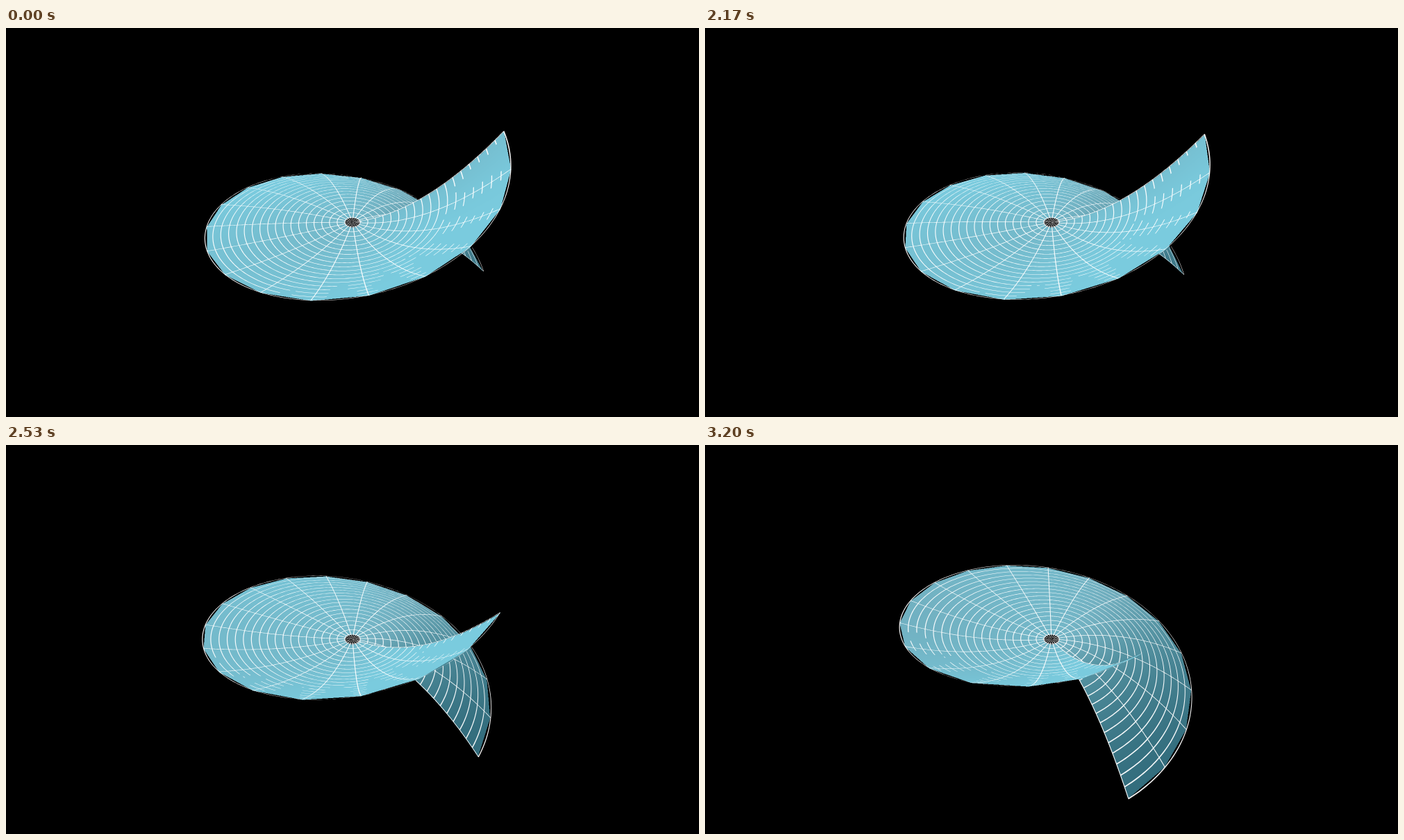
Animation of 998x561 px, one loop 5 s. Source, as an HTML page with a canvas:

```html
<!DOCTYPE html>
<html lang="en">
<head>
<meta charset="utf-8">
<title>Spiral sheet</title>
<style>
  html, body { margin: 0; width: 100%; height: 100%; overflow: hidden; background: #000; }
  canvas { display: block; width: 998px; height: 561px; }
</style>
</head>
<body>
<canvas id="stage" width="998" height="561"></canvas>
<script>
const ctx = document.getElementById('stage').getContext('2d');
const TAU = 2 * Math.PI, RAD = Math.PI / 180;

// Sheet: height = TWIST * (psi - PI) * r^2, with psi measured from the cut.
const RADIUS = 3, CELLS = 19, TWIST = 1 / 15;
const CUT_START = 10 * RAD, CUT_END = -60 * RAD;

// Mesh lines are flat ribbons lying just above the sheet.
const NUDGE = 0.01, HALF_WIDTH = 0.008, DEPTH_BIAS = 0.0007;

// Perspective camera
const CENTER_X = 499, CENTER_Y = 280.5, UNIT = 561 / 8, FOCAL = 16;
const SIN = Math.sin(50 * RAD), COS = Math.cos(50 * RAD);
const LIGHT = [-10, 10, 10];
const SHADES = [
  [-0.25, 50, 108, 124],
  [0.2, 84, 146, 161],
  [0.45, 112, 173, 189],
  [0.85, 122, 203, 222]
];

// Supersampled buffer around the sheet, with a depth value per pixel
const BOX = { x: 268, y: 138, w: 474, h: 384 }, SS = 2;
const bufferW = BOX.w * SS, bufferH = BOX.h * SS;
const buffer = document.createElement('canvas');
buffer.width = bufferW;
buffer.height = bufferH;
const bufferCtx = buffer.getContext('2d');
const image = bufferCtx.createImageData(bufferW, bufferH);
const depth = new Float32Array(bufferW * bufferH);

function project(x, y, z) {
  const scale = FOCAL / (FOCAL - (z * COS - y * SIN));
  return {
    x: CENTER_X + x * scale * UNIT,
    y: CENTER_Y - (z * SIN + y * COS) * scale * UNIT,
    near: scale
  };
}

function sheetPoint(r, psi, cut) {
  const q = psi - Math.PI;
  const x = r * Math.cos(cut + psi), y = r * Math.sin(cut + psi);
  const nx = -TWIST * (2 * q * x - y), ny = -TWIST * (2 * q * y + x);
  const len = Math.hypot(nx, ny, 1);
  return { pos: [x, y, TWIST * q * r * r], normal: [nx / len, ny / len, 1 / len] };
}

function shade({ pos, normal }) {
  const toLight = LIGHT.map((v, i) => v - pos[i]);
  const lit = toLight.reduce((sum, v, i) => sum + v * normal[i], 0) / Math.hypot(...toLight);
  let i = 0;
  while (i < SHADES.length - 2 && lit > SHADES[i + 1][0]) i++;
  const a = SHADES[i], b = SHADES[i + 1];
  const f = Math.min(1, Math.max(0, (lit - a[0]) / (b[0] - a[0])));
  return [1, 2, 3].map(c => a[c] + (b[c] - a[c]) * f);
}

function surfaceVertex(ring, spoke, cut) {
  const point = sheetPoint(RADIUS * ring / CELLS, TAU * spoke / CELLS, cut);
  const p = project(...point.pos);
  return { x: (p.x - BOX.x) * SS, y: (p.y - BOX.y) * SS, near: p.near, color: shade(point) };
}

function fillTriangle(a, b, c) {
  const area = (b.x - a.x) * (c.y - a.y) - (b.y - a.y) * (c.x - a.x);
  if (Math.abs(area) < 1e-6) return;
  const left = Math.max(0, Math.floor(Math.min(a.x, b.x, c.x)));
  const right = Math.min(bufferW - 1, Math.ceil(Math.max(a.x, b.x, c.x)));
  const top = Math.max(0, Math.floor(Math.min(a.y, b.y, c.y)));
  const bottom = Math.min(bufferH - 1, Math.ceil(Math.max(a.y, b.y, c.y)));
  for (let row = top; row <= bottom; row++) {
    for (let col = left; col <= right; col++) {
      const x = col + 0.5, y = row + 0.5;
      const u = ((b.x - x) * (c.y - y) - (b.y - y) * (c.x - x)) / area;
      const v = ((c.x - x) * (a.y - y) - (c.y - y) * (a.x - x)) / area;
      const w = 1 - u - v;
      if (u < 0 || v < 0 || w < 0) continue;
      const near = u * a.near + v * b.near + w * c.near;
      const i = row * bufferW + col;
      if (near <= depth[i]) continue;
      depth[i] = near;
      for (let k = 0; k < 3; k++) {
        image.data[4 * i + k] = u * a.color[k] + v * b.color[k] + w * c.color[k];
      }
      image.data[4 * i + 3] = 255;
    }
  }
}

function drawSurface(cut) {
  depth.fill(0);
  image.data.fill(0);
  const grid = [];
  for (let ring = 0; ring <= CELLS; ring++) {
    grid.push(Array.from({ length: CELLS + 1 }, (_, spoke) => surfaceVertex(ring, spoke, cut)));
  }
  // The innermost ring of cells stays open.
  for (let i = 1; i < CELLS; i++) {
    for (let j = 0; j < CELLS; j++) {
      fillTriangle(grid[i][j], grid[i + 1][j], grid[i][j + 1]);
      fillTriangle(grid[i + 1][j], grid[i + 1][j + 1], grid[i][j + 1]);
    }
  }
  bufferCtx.putImageData(image, 0, 0);
  ctx.drawImage(buffer, BOX.x, BOX.y, BOX.w, BOX.h);
}

function isVisible(p) {
  const col = Math.floor((p.x - BOX.x) * SS), row = Math.floor((p.y - BOX.y) * SS);
  if (col < 0 || row < 0 || col >= bufferW || row >= bufferH) return true;
  return p.near >= depth[row * bufferW + col] - DEPTH_BIAS;
}

function meshPoint(r, psi, cut) {
  const { pos, normal } = sheetPoint(r, psi, cut);
  return project(...pos.map((v, k) => v + NUDGE * normal[k]));
}

// Adds the unhidden parts of a ribbon; at(f, side) gives [r, psi] for side -1, 0 or 1.
function traceRibbon(steps, cut, at) {
  let last = null;
  for (let i = 0; i <= steps; i++) {
    const [a, mid, b] = [-1, 0, 1].map(side => meshPoint(...at(i / steps, side), cut));
    const visible = isVisible(mid);
    if (visible && last) {
      ctx.moveTo(last.a.x, last.a.y);
      ctx.lineTo(a.x, a.y);
      ctx.lineTo(b.x, b.y);
      ctx.lineTo(last.b.x, last.b.y);
      ctx.closePath();
    }
    last = visible ? { a, b } : null;
  }
}

function drawMesh(cut) {
  ctx.beginPath();
  for (let i = 0; i <= CELLS; i++) {
    const f = i / CELLS;
    if (i) traceRibbon(CELLS * 16, cut, (t, side) => [RADIUS * f + side * HALF_WIDTH, TAU * t]);
    // Spokes taper towards the centre.
    traceRibbon(CELLS * 8, cut, (t, side) => {
      const r = RADIUS * t;
      return [r, TAU * f - side * HALF_WIDTH / Math.max(r, 0.15)];
    });
  }
  ctx.fillStyle = 'rgba(255,255,255,0.95)';
  ctx.fill();
}

function smooth(t) {
  const sigmoid = v => 1 / (1 + Math.exp(-v));
  const edge = sigmoid(-5);
  const x = Math.min(1, Math.max(0, t));
  return (sigmoid(10 * (x - 0.5)) - edge) / (1 - 2 * edge);
}

let drawnCut = null;
function frame() {
  const time = performance.now() % 5000;
  const cut = CUT_START + (CUT_END - CUT_START) * smooth((time - 2000) / 1000);
  if (cut !== drawnCut) {
    drawnCut = cut;
    ctx.fillStyle = '#000';
    ctx.fillRect(0, 0, 998, 561);
    drawSurface(cut);
    drawMesh(cut);
  }
  requestAnimationFrame(frame);
}
frame();
</script>
</body>
</html>
```
